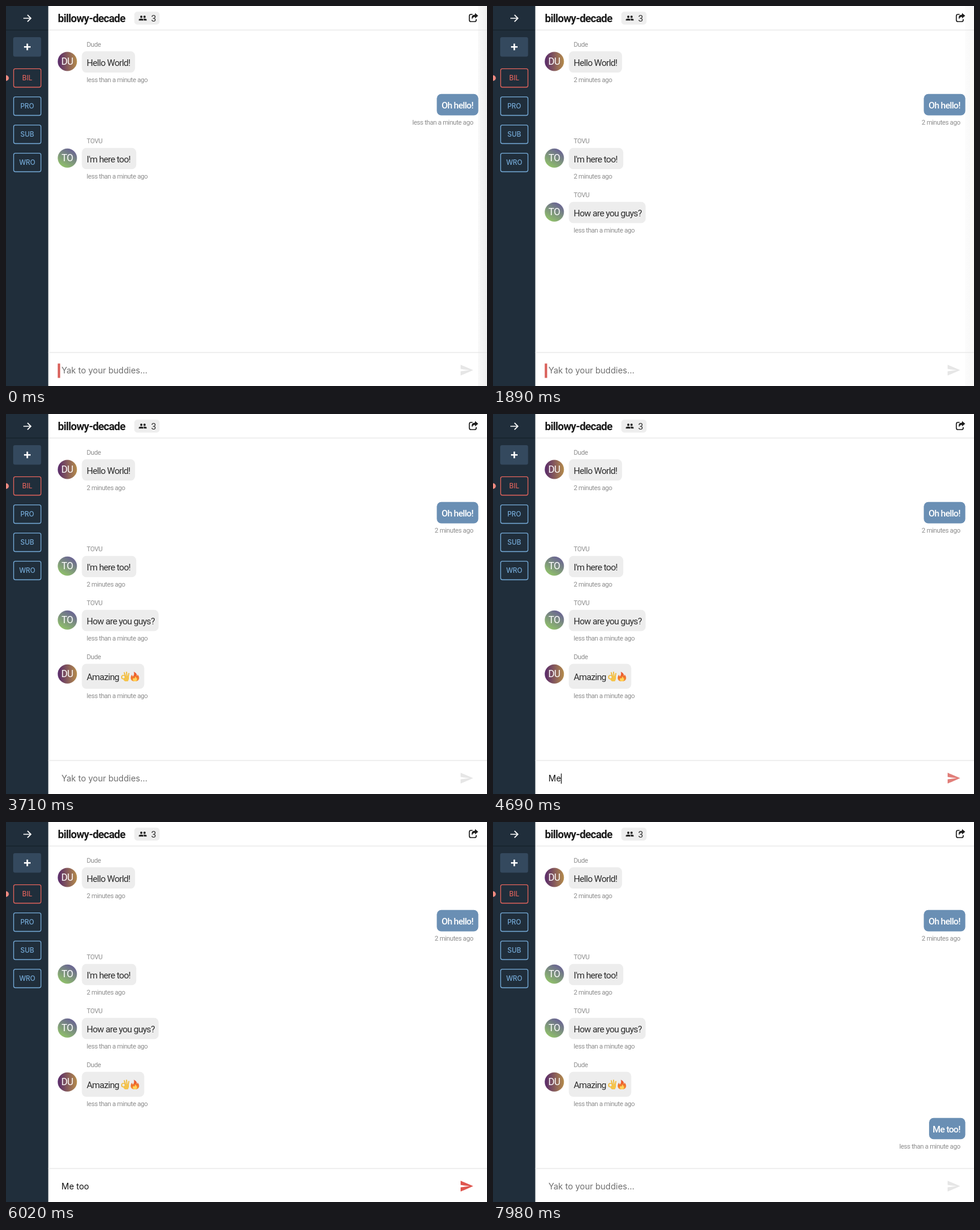
Animation, 802 px wide and 634 px high, one loop 8050 ms. Source, as an HTML page:

```html
<!DOCTYPE html>
<html lang="en">
<head>
<meta charset="utf-8">
<title>Group chat</title>
<style>
  html, body { margin: 0; width: 100%; height: 100%; overflow: hidden; background: #fff; }
  svg { display: block; }
  text { white-space: pre; }
  .msg { font: 15px Roboto, sans-serif; letter-spacing: -.7px; fill: #2d2d2d; }
  .mine { fill: #fff; font-weight: 500; text-anchor: end; }
  .note { font: 11px Roboto, sans-serif; letter-spacing: -.42px; fill: #8e8e8e; }
  .end { text-anchor: end; }
  .initials { font: 16px Roboto, sans-serif; letter-spacing: -.7px; fill: #fff; text-anchor: middle; }
  .title { font: 700 18px Roboto, sans-serif; letter-spacing: -.75px; fill: #1b1b1b; }
  .room { font: 500 11.2px Inter, sans-serif; text-anchor: middle; }
  .input { font: 14px Inter, sans-serif; }
</style>
</head>
<body>
<svg width="802" height="634" viewBox="0 0 802 634">
  <defs>
    <linearGradient id="DU"><stop stop-color="#57296b"/><stop offset="1" stop-color="#b58c4b"/></linearGradient>
    <linearGradient id="TO" x1=".8" y1="0" x2=".2" y2="1"><stop stop-color="#675d96"/><stop offset="1" stop-color="#92c667"/></linearGradient>
    <linearGradient id="shade"><stop stop-color="#f9f9f9"/><stop offset="1" stop-color="#f0f0f0"/></linearGradient>
    <linearGradient id="flame" x2="0" y2="1"><stop stop-color="#e8492c"/><stop offset="1" stop-color="#f6952f"/></linearGradient>
  </defs>
  <rect width="802" height="634" fill="#fff"/>
  <rect id="gutter" x="787" width="15" height="634" fill="url(#shade)"/>

  <!-- sidebar -->
  <rect width="70.5" height="634" fill="#202e3b"/>
  <rect y="39.5" width="70.5" height="1.2" fill="#15202a"/>
  <path d="M29 20.5H41M35.8 14.8 41.5 20.5 35.8 26.2" fill="none" stroke="#fff" stroke-width="1.7"/>
  <rect x="12" y="52" width="46.5" height="32.5" rx="3" fill="#34495e"/>
  <path d="M30 68.2H41M35.5 62.7V73.7" stroke="#fff" stroke-width="2.6"/>
  <g id="rooms"></g>
  <circle cx="0" cy="120.3" r="4.7" fill="#ee8a81"/>

  <!-- header -->
  <rect x="70.5" y="39.5" width="731.5" height="1.2" fill="#e6e6e6"/>
  <text class="title" x="86.5" y="27">billowy-decade</text>
  <rect x="214" y="9.5" width="42" height="21.5" rx="5" fill="#eeeeee"/>
  <g fill="#222">
    <circle cx="225.6" cy="18" r="1.9"/><circle cx="231" cy="18" r="1.9"/>
    <path d="M221.5 24.2V22.8Q221.5 21 225.5 21 229 21 229 22.8V24.2ZM229.8 24.2V22.5L229.2 21.1Q234.5 20.6 234.5 22.8V24.2Z"/>
  </g>
  <text class="msg" x="242" y="26">3</text>
  <path d="M778 14H775Q772.6 14 772.6 16.5V23.5Q772.6 26 775 26H781.5Q784 26 784 23.5V22" fill="none" stroke="#1d1d1d" stroke-width="1.7"/>
  <path d="M782 11.8 787.3 16.3 782 20.8V18.3Q778 18 777 22.8 774.5 14.6 782 14.4Z" fill="#1d1d1d"/>

  <g id="chat"></g>

  <!-- composer -->
  <rect x="70.5" y="577.5" width="731.5" height="1.2" fill="#e6e6e6"/>
  <rect id="bar" x="86.3" y="596.5" width="4" height="24" fill="#d9605a"/>
  <text id="hint" class="input" x="92.5" y="613" fill="#6f6f6f">Yak to your buddies...</text>
  <text id="typed" class="input" x="92.5" y="613" fill="#111"></text>
  <rect id="caret" y="599.8" width="1.2" height="17" fill="#111"/>
  <path id="send" transform="translate(756 595.6)" d="M2 21 23 12 2 3V10L17 12 2 14Z"/>
</svg>
<script>
const LOOP = 8050, SECOND = 770, FOCUS = 2170, THIRD = 2870, SENT = 7100;
const KEYS = [4510, 4650, 4830, 4970, 5110, 5250, 6370], DRAFT = 'Me too!';
const $ = id => document.getElementById(id);
const NOW = 'less than a minute ago', OLD = '2 minutes ago';

const text = (cls, x, y, s) => `<text class="${cls}" x="${x}" y="${y}">${s}</text>`;

$('rooms').innerHTML = ['BIL', 'PRO', 'SUB', 'WRO'].map((name, i) => {
  const color = i ? '#74a9d6' : '#dd625b', y = 104.7 + i * 47;
  return `<rect x="12.7" y="${y}" width="45.6" height="30.8" rx="3" fill="none" stroke="${color}" stroke-width="1.3"/>
    <g fill="${color}">${text('room', 35.4, y + 19.6, name)}</g>`;
}).join('');

const emoji = `
  <g fill="none" stroke="#f2bd3f" stroke-linecap="round">
    <circle cx="195.8" cy="439" r="3" stroke-width="1.7"/>
    <path stroke-width="1.9" d="M199.4 438 197.2 431.6M201.6 438 201 430.8M203.6 439 204.8 433"/>
  </g>
  <path d="M198.6 437.5 204.8 437Q206 441.5 203.2 446H198.4Q196 444.5 195.6 442.4 199.6 441.5 198.6 437.5Z" fill="#f5c44c"/>
  <path d="M213 430Q219 433 218.2 437.2 219.6 436.5 219.4 434.5 222 437.5 222 441 221.5 446 215 446 208.2 446 207.8 440.5 207.8 437.2 210.2 434.8 210.2 437.3 211.7 438 214.7 434 213 430Z" fill="url(#flame)"/>
  <path d="M215.3 437.5Q218.8 441 218.4 443.2 217.8 446 215 446 211.6 446 211.5 443 211.7 441 213.2 440.3 214 441 214.2 441.5 215.7 440 215.3 437.5Z" fill="#ffd45a"/>`;

const messages = [
  { who: 'Dude', body: 'Hello World!', y: 75.5, w: 88.7, at: 0, ages: true },
  { body: 'Oh hello!', y: 146.8, w: 69.2, at: 0, ages: true },
  { who: 'TOVU', body: "I'm here too!", y: 236.7, w: 90.7, at: 0, ages: true },
  { who: 'TOVU', body: 'How are you guys?', y: 326.7, w: 128, at: SECOND },
  { who: 'Dude', body: 'Amazing', y: 416.7, w: 104, h: 41.8, at: THIRD, extra: emoji },
  { body: 'Me too!', y: 493.7, w: 60.4, at: SENT }
];

function bubble({ who, body, y, w, h = 35.6, extra = '' }) {
  const x = who ? 126.5 : 787.5 - w, base = y + h / 2 + 6.2;
  const box = `<rect x="${x}" y="${y}" width="${w}" height="${h}" rx="7.5" fill="${who ? '#ededed' : '#6a8fb4'}"/>`;
  if (!who) return box + text('msg mine', 779, base, body) + text('note end', 779, y + h + 15.9, NOW);
  const id = who.slice(0, 2).toUpperCase();
  return box + `<circle cx="102.3" cy="${y + 17}" r="16" fill="url(#${id})"/>`
    + text('initials', 102, y + 22.7, id) + text('note', 134.5, y - 7.4, who)
    + text('msg', 134.5, base, body) + extra + text('note', 134.5, y + h + 15.9, NOW);
}

$('chat').innerHTML = messages.map(m => `<g>${bubble(m)}</g>`).join('');
messages.forEach((m, i) => {
  m.node = $('chat').children[i];
  m.age = m.node.lastElementChild;
});

const clamp = v => Math.max(0, Math.min(1, v));
const show = (el, on) => el.style.opacity = +on;

function barOpacity(t) {
  if (t >= FOCUS) return 0;
  if (t < SECOND) return 1;
  const p = (t + 80) % 1000;
  return p < 500 ? clamp(1 - p / 90) : clamp((p - 500) / 90);
}

function render(t) {
  for (const m of messages) {
    show(m.node, t >= m.at);
    if (m.ages) m.age.textContent = t < SECOND ? NOW : OLD;
  }
  show($('bar'), barOpacity(t));
  show($('gutter'), clamp((2030 - t) / 280));

  const count = t < SENT ? KEYS.filter(k => k <= t).length : 0;
  $('typed').textContent = DRAFT.slice(0, count);
  show($('hint'), !count);

  // The thin caret restarts its blink at every keystroke.
  const last = Math.max(...[FOCUS, ...KEYS, SENT].filter(k => k <= t));
  $('caret').setAttribute('x', 92.5 + (count ? $('typed').getComputedTextLength() : 0));
  show($('caret'), t >= FOCUS && (t - last) % 1000 < 500);

  const heat = clamp((t - KEYS[0]) / 250) * (1 - clamp((t - SENT) / 250));
  const mix = (a, b) => Math.round(a + (b - a) * heat);
  $('send').setAttribute('fill', `rgb(${mix(230, 223)},${mix(230, 86)},${mix(230, 79)})`);
}

function tick() {
  render(performance.now() % LOOP);
  requestAnimationFrame(tick);
}
tick();
</script>
</body>
</html>
```
